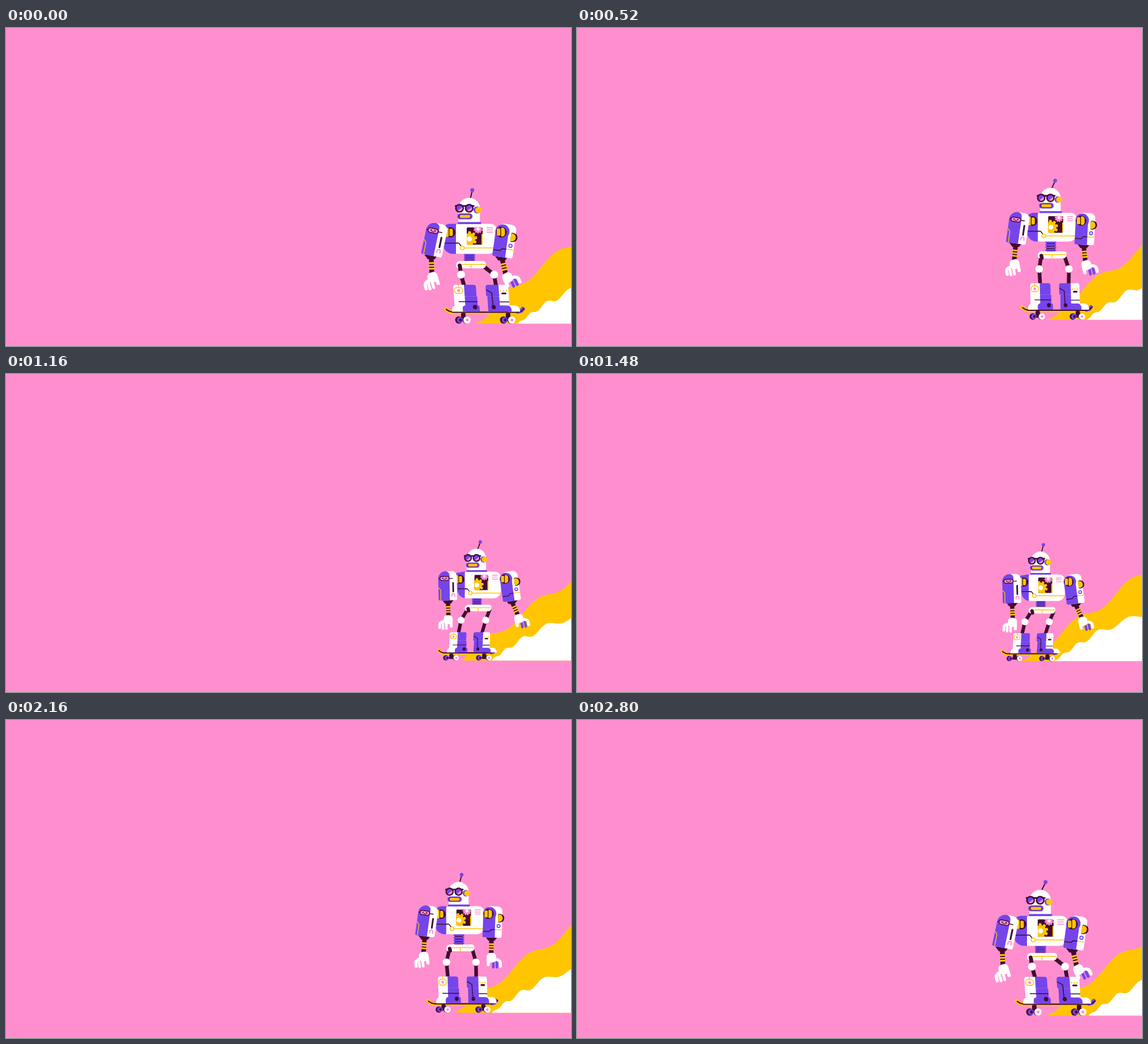
Write an HTML page with a canvas that moves like this. It is 997 px wide and 561 px high and loops after 2.84 s.

```html
<!DOCTYPE html>
<html lang="en">
<head>
<meta charset="utf-8">
<title>Skating robot</title>
<style>
html, body { margin: 0; width: 100%; height: 100%; overflow: hidden; background: #ff8ecf; }
canvas { display: block; width: 997px; height: 561px; }
</style>
</head>
<body>
<canvas id="stage" width="997" height="561"></canvas>
<script>
const W = 997, H = 561, LOOP = 2840, CYCLE = 2800, STEP = 40, TAU = Math.PI * 2;
const PINK = '#ff8ecf', PURPLE = '#7545eb', YELLOW = '#ffc500', DARK = '#420b30', WHITE = '#fff';
const ctx = document.getElementById('stage').getContext('2d');

const TIMES = [0, 280, 800, 1160, 1800, 2160];
const BOB_TIMES = [0, 280, 560, 800, 1160, 1480, 1800, 2160, 2480];

// A seventh value ends the cycle elsewhere than it began.
const TRACKS = {
  base: [521.5, 519, 509.5, 505.5, 509.5, 516.5],
  scale: [1, .98, .925, .885, .895, .935],
  turn: [1, .99, .87, .83, .84, .95],
  bodyX: [830, 841.5, 851, 841.5, 817, 810.5],
  boardX: [844, 852.5, 834, 813, 791.5, 805],
  deck: [21, 20.5, 16, 16, 15.5, 17.8],
  bootX: [809, 818, 813, 798, 775, 780],
  bootTop: [453, 450, 451.5, 455.5, 457.5, 452.5],
  armL: [12, 12, 3, -1, 0, 8],
  rodL: [-2, 2, 7, -2, -1, 4],
  handL: [-17, -15, -5, 0, 0, -8],
  armR: [8, 5, 0, -8, -5, 2],
  rodR: [-13, -10, -4, -24, -19, 1],
  handR: [-25, -22, -5, -12, -10, 0],
  antenna: [5.5, 7.6, 9.4, 7.6, 4.8, 5.8, 9.5],
  smokeY: [418, 427, 412, 396, 387, 400, 426],
  smokeX: [945, 985, 985, 1007, 1095, 1180, 1310],
  puff: [1.97, 2.31, 2.75, 3.08, 4.28, 4.97, 5.97]
};
const BOB = [176, 181, 199, 196, 177, 173, 183, 201, 187];

// Cubic curve through the keys, continued across the cycle's ends.
function spline(times, values, t) {
  const n = times.length, drift = (values[n] ?? values[0]) - values[0];
  const key = i => {
    const lap = Math.floor(i / n), k = i - lap * n;
    return [times[k] + lap * CYCLE, values[k] + lap * drift];
  };
  let i = n - 1;
  while (i > 0 && times[i] > t) i--;
  const [a, b, c, d] = [key(i - 1), key(i), key(i + 1), key(i + 2)];
  const span = c[0] - b[0], u = (t - b[0]) / span;
  const m1 = (c[1] - a[1]) / (c[0] - a[0]) * span;
  const m2 = (d[1] - b[1]) / (d[0] - b[0]) * span;
  const u2 = u * u, u3 = u2 * u;
  return (2 * u3 - 3 * u2 + 1) * b[1] + (u3 - 2 * u2 + u) * m1
    + (3 * u2 - 2 * u3) * c[1] + (u3 - u2) * m2;
}

function disc(x, y, r, color) {
  ctx.fillStyle = color;
  ctx.beginPath();
  ctx.arc(x, y, r, 0, TAU);
  ctx.fill();
}

function ring(x, y, r, color, width) {
  ctx.strokeStyle = color;
  ctx.lineWidth = width;
  ctx.beginPath();
  ctx.arc(x, y, r, 0, TAU);
  ctx.stroke();
}

function box(x, y, w, h, r, color) {
  ctx.fillStyle = color;
  ctx.beginPath();
  ctx.roundRect(x, y, w, h, r);
  ctx.fill();
}

function line(points, color, width, cap = 'round') {
  ctx.strokeStyle = color;
  ctx.lineWidth = width;
  ctx.lineCap = cap;
  ctx.lineJoin = 'round';
  ctx.beginPath();
  points.forEach(p => ctx.lineTo(p[0], p[1]));
  ctx.stroke();
}

function at(x, y, sx, sy, degrees, draw) {
  ctx.save();
  ctx.translate(x, y);
  ctx.rotate(degrees * Math.PI / 180);
  ctx.scale(sx, sy);
  draw();
  ctx.restore();
}

function hill(from, base, height, color) {
  ctx.fillStyle = color;
  ctx.beginPath();
  ctx.moveTo(from, base);
  for (let x = from; x <= W + 2; x += 2) ctx.lineTo(x, Math.min(base, height(x)));
  ctx.lineTo(W + 2, base);
  ctx.fill();
}

function drawSmoke(p) {
  const start = p.boardX - 18;
  hill(start, p.base, x => {
    const d = x - start;
    const wave = p.smokeY - .72 * (x - 949) - 8 * Math.sin(TAU * (x - p.smokeX) / 95);
    return Math.max(wave, p.base - .012 * d * d - .25 * d);
  }, YELLOW);
  const foam = p.boardX + 59 * p.wide;
  hill(foam, p.base, x => {
    const d = x - foam, phase = Math.log(1 + d / 35) / .4 - p.puff;
    return p.base - .78 * d + .0017 * d * d - Math.min(5, 1 + .06 * d) * Math.sin(TAU * phase);
  }, WHITE);
}

function drawBoard(p) {
  const { scale: s, wide } = p, r = 6.4 * wide;
  const gap = (13 + (1 - p.turn) * 35) * s / 2;
  at(p.boardX, p.deckY, wide, s, 0, () => {
    line([[-58, 2.6], [56, 2.6]], YELLOW, 4);
    line([[-68, -5], [-63, -1], [-56, 1.5]], YELLOW, 7);
    line([[59, 0], [65, -1.5], [68, -5]], PURPLE, 7);
    line([[-67, -4], [-62, -1], [-56, .8], [58, .8], [65, -.5], [70, -5]], DARK, 2.2);
  });
  for (const offset of [-37, 42]) {
    const x = p.boardX + offset * wide, y = p.base - r;
    box(x - 4 * s, p.deckY + 2, 8 * s, y - p.deckY, 2, DARK);
    line([[x - gap, y], [x + gap, y]], DARK, 3.5 * s);
    disc(x - gap - 1.5 * s, y, r, DARK);
    disc(x - gap + .5 * s, y, r * .82, PURPLE);
    disc(x - gap + 1.5 * s, y, r * .4, DARK);
    disc(x + gap - 1.2 * s, y, r, DARK);
    disc(x + gap, y, r, WHITE);
    disc(x + gap + .3, y, r * .4, PINK);
  }
}

function drawBoot(p, x, right) {
  at(x, p.bootTop, p.wide, (p.deckY - p.bootTop) / 47, 0, () => {
    ctx.transform(1, 0, (p.turn - .9) * .7, 1, 0, 0);
    if (right) {
      box(2, 0, 19, 38, [0, 4, 2, 0], WHITE);
      box(18, 36, 21, 11, [4, 9, 0, 0], WHITE);
      box(-19, 0, 23, 20, [4, 0, 0, 2], PURPLE);
      box(-17, 20, 21, 27, 1, PURPLE);
      box(-17, 36, 41, 11, [0, 7, 0, 0], PURPLE);
      line([[-18, 9], [-9, 14], [-8, 38]], DARK, 1.6);
      disc(-7, 39, 3.6, DARK);
      for (const dot of [7, 12, 17]) disc(dot, 10.5, 1.3, YELLOW);
      box(8, 13.5, 9, 3, 1.5, DARK);
      line([[4, 30], [21, 30]], DARK, 1.5, 'butt');
    } else {
      box(-20, 0, 22, 38, [4, 0, 0, 3], WHITE);
      box(-25, 36, 25, 11, [8, 0, 0, 0], WHITE);
      box(-1, 0, 21, 20, [0, 4, 2, 0], PURPLE);
      box(-1, 20, 22, 27, 1, PURPLE);
      box(-6, 36, 30, 11, [5, 2, 0, 0], PURPLE);
      disc(-11, 10, 2.6, PINK);
      ctx.strokeStyle = YELLOW;
      ctx.lineWidth = 1.6;
      ctx.beginPath();
      ctx.roundRect(-18, 5, 14, 10, 4);
      ctx.stroke();
      line([[-11, 0], [-11, 4]], YELLOW, 1.5);
      line([[-12, 29.5], [21, 29.5]], DARK, 1.5, 'butt');
      disc(16, 39, 3.8, DARK);
    }
  });
}

function drawLegs(p) {
  const s = p.scale, hipX = p.bodyX - 9.5 * s;
  const kneeY = (p.pelvisY + p.bootTop) / 2 + 3;
  const bend = -6 + (1 - p.turn) * 65;
  for (const right of [false, true]) {
    const bootX = p.bootX + (right ? 56 * p.wide : 0);
    const knee = [bootX + bend + (right ? 2.3 : 0), kneeY];
    const hip = [hipX + (right ? 23 : -20) * s, p.pelvisY + (right ? 10 : 7) * s];
    line([hip, knee, [bootX, p.bootTop + 4]], DARK, 6.8 * s);
    drawBoot(p, bootX, right);
    disc(...knee, 7 * s, WHITE);
  }
  at(hipX, p.pelvisY, s, s, 0, () => {
    box(-26.5, 0, 53, 13, [7, 5, 6, 5], WHITE);
    line([[-20, 9], [-15, 6], [25, 6]], YELLOW, 1.5);
    line([[0, 6], [0, 13]], YELLOW, 1.5, 'butt');
    line([[-20, 8], [-19, 12]], DARK, 6.8);
  });
}

function drawWaist(p) {
  const s = p.scale, x = p.bodyX - 12 * s, top = p.bodyY + 52 * s;
  const gap = p.pelvisY - top;
  box(x - 8 * s, top, 16 * s, gap, 0, DARK);
  for (let i = 0; i < 4; i++) {
    box(x - 10 * s, top + gap * (i + .14) / 4, 20 * s, gap * .18, 1, PURPLE);
  }
}

function gear(x, y, r, teeth, angle, color, hole) {
  at(x, y, 1, 1, angle, () => {
    for (let i = 0; i < teeth; i++) {
      ctx.rotate(TAU / teeth);
      box(-r * .19, -r, r * .38, r, r * .12, color);
    }
    disc(0, 0, r * .75, color);
    disc(0, 0, r * .33, hole);
  });
}

function drawTorso(p, t) {
  const side = 23 * (2 * p.turn - 1);
  box(-36 - side, 0, side + 4, 53, [12, 0, 0, 18], PURPLE);
  disc(-47, 14, 12.5, PURPLE);
  disc(-46, 15, 9, DARK);
  box(-36, 0, 72, 53, [3, 11, 15, 0], WHITE);
  line([[-35 - side, 34], [-32, 34]], DARK, 1.6, 'butt');
  line([[-36, 34], [-31, 34], [-27, 39]], DARK, 1.6);
  ring(-25, 42.5, 3.5, YELLOW, 1.7);
  line([[-21, 42.5], [36, 42.5]], YELLOW, 1.7, 'butt');

  ctx.save();
  ctx.beginPath();
  ctx.roundRect(-17, 6, 28, 31, 2);
  ctx.clip();
  box(-17, 6, 28, 31, 0, DARK);
  box(9, 18, 3, 19, 0, YELLOW);
  gear(3, 9, 8, 10, -t * .09, PINK, WHITE);
  gear(-12, 26.5, 13.5, 9, t * .07, YELLOW, WHITE);
  ctx.restore();

  for (const y of [7, 10.8, 14.6]) line([[18.5, y], [28.5, y]], PINK, 1.6);
}

function drawHead(p) {
  line([[2, -44], [p.antenna, -59]], DARK, 2);
  disc(p.antenna, -59.5, 3.4, PURPLE);
  box(-19, -46, 38, 45, [19, 19, 0, 0], WHITE);
  box(-20, -3.2, 41, 3.6, 1, PURPLE);
  disc(14, -24.5, 6.2, PURPLE);
  disc(16.2, -24.5, 5.6, YELLOW);

  line([[-24, -31.5], [8, -31.5]], DARK, 3);
  for (const x of [-17, 0]) {
    disc(x, -27.5, 7.8, DARK);
    disc(x, -27.5, 5.2, PURPLE);
    ctx.fillStyle = PINK;
    ctx.beginPath();
    ctx.arc(x, -27.5, 5.2, -.4, 2.2);
    ctx.fill();
  }
  box(-21, -18.5, 27, 10.5, 5.2, PURPLE);
  box(-18.5, -16.2, 21, 6, 3, DARK);
  box(-17, -15.8, 19, 5.2, 2.4, YELLOW);
}

function drawHand(side, fingers) {
  ctx.scale(side, 1);
  line([[4, 15], [4, 25]], fingers, 5);
  line([[10.8, 15], [10.8, 25]], fingers, 5);
  box(-8.5, -2, 18, 18, 7, WHITE);
  line([[-5.5, 9], [-5.5, 20]], WHITE, 6);
  line([[4, 10], [12, 11], [16.5, 14], [17.3, 17], [17.3, 23]], WHITE, 5.6);
}

function drawForearm(rod, hand, side, fingers) {
  ctx.fillStyle = DARK;
  ctx.beginPath();
  ctx.moveTo(-12, -2);
  ctx.lineTo(12, -2);
  ctx.lineTo(6, 6);
  ctx.lineTo(-6, 6);
  ctx.fill();
  at(0, 0, 1, 1, rod, () => {
    box(-4.2, 0, 8.4, 34, 1, DARK);
    for (const y of [11, 16, 21]) box(-5, y, 10, 3, 1.2, YELLOW);
    at(0, 31, 1, 1, hand - rod, () => drawHand(side, fingers));
  });
}

function drawLeftArm(p) {
  box(-55, 7, 7, 16, 3, YELLOW);
  box(-48.5, 8.5, 7, 13, 3, YELLOW);
  line([[-48.2, 7.5], [-48.2, 22]], DARK, 1.3);
  at(-70.5, 13.5, 1, 1, p.armL, () => {
    at(0, 44, 1, 1, -p.armL, () => drawForearm(p.rodL, p.handL, -1, WHITE));
    box(-10, -14.5, 28.5, 58, [9, 10, 3, 0], WHITE);
    box(-18.5, -14.5, 22.5, 58, [17, 9, 0, 3], PURPLE);
    line([[-17.5, 0], [10, 0]], DARK, 1.5);
    box(-16, -5, 20, 9.5, 4.7, DARK);
    box(-14.3, -3.4, 16.6, 6.4, 3.2, PINK);
    disc(-9.5, -.6, 1.3, DARK);
    disc(-2.5, -.6, 1.3, DARK);
    line([[-8, 1.4], [-4, 1.4]], DARK, 1);
    line([[-18, 18], [-14, 23], [-14, 43]], YELLOW, 1.5, 'butt');
    line([[11, 9], [11, 26]], DARK, 3.2);
    ctx.strokeStyle = PINK;
    ctx.lineWidth = 2;
    ctx.beginPath();
    ctx.arc(11, 33, 2.8, Math.PI, 0);
    ctx.lineTo(13.8, 36);
    ctx.moveTo(8.2, 33);
    ctx.lineTo(8.2, 36);
    ctx.stroke();
  });
}

function drawRightArm(p) {
  at(50, 14, 1, 1, p.armR, () => {
    at(1, 45, 1, 1, -p.armR, () => drawForearm(p.rodR, p.handR, 1, PURPLE));
    disc(15, 8, 8.8, DARK);
    disc(13.5, 8, 7.8, YELLOW);
    box(-14, -14, 34, 59, [13, 9, 3, 0], WHITE);
    ctx.save();
    ctx.beginPath();
    ctx.rect(12, -2, 14, 20);
    ctx.clip();
    disc(15, 8, 8.2, DARK);
    disc(14, 8, 7, YELLOW);
    ctx.restore();
    box(-16, 0, 23, 45, [0, 4, 0, 3], PURPLE);
    disc(-4, 0, 12.5, PURPLE);
    line([[-15.5, 34], [-4, 34], [0, 30], [7, 30]], DARK, 1.5, 'butt');
    line([[7, 30], [19, 30]], YELLOW, 1.5, 'butt');
    ring(13.5, 23, 2.8, PURPLE, 1.9);
  });
  disc(44, 14.5, 9.5, DARK);
  box(36, 8, 7, 13, 3, YELLOW);
  box(43, 6.5, 7.5, 16, [3, 6, 6, 3], YELLOW);
  line([[43, 7], [43, 22]], DARK, 1.3);
}

function pose(t) {
  const p = {};
  for (const name in TRACKS) p[name] = spline(TIMES, TRACKS[name], t);
  const height = spline(BOB_TIMES, BOB, t);
  p.wide = p.scale * p.turn;
  p.bodyY = p.base - height * p.scale;
  p.pelvisY = p.base - (110.5 + (height - 176) * .74) * p.scale;
  p.deckY = p.base - p.deck * p.scale;
  return p;
}

function render(time) {
  const t = Math.min(CYCLE, Math.floor(time % LOOP / STEP) * STEP);
  const p = pose(t);
  ctx.fillStyle = PINK;
  ctx.fillRect(0, 0, W, H);
  drawSmoke(p);
  drawBoard(p);
  drawLegs(p);
  drawWaist(p);
  at(p.bodyX, p.bodyY, p.scale, p.scale, 0, () => {
    drawTorso(p, t);
    at(-12.7, 0, 1, 1, 0, () => drawHead(p));
    drawLeftArm(p);
    drawRightArm(p);
  });
}

const begin = performance.now();
function tick() {
  render(performance.now() - begin);
  requestAnimationFrame(tick);
}
tick();
</script>
</body>
</html>
```
